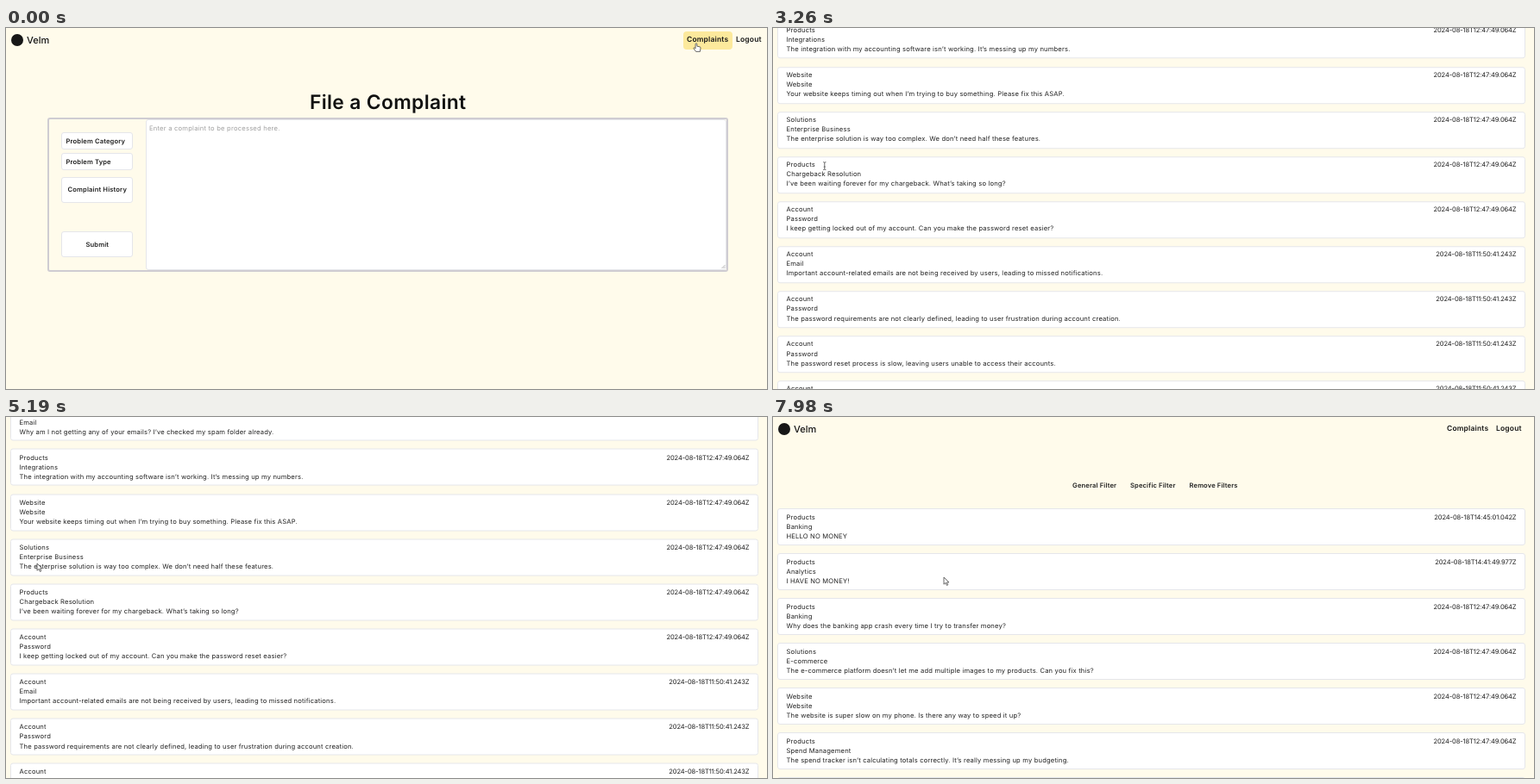
An HTML page that plays this animation: 882 px wide and 419 px high, repeating every 8000 ms.

```html
<!DOCTYPE html>
<html lang="en">
<head>
<meta charset="utf-8">
<title>Complaints</title>
<style>
  html, body { margin: 0; width: 100%; height: 100%; overflow: hidden; background: #fffbeb; }
  body { position: relative; font: 440 7.6px Inter, sans-serif; font-optical-sizing: none;
    text-rendering: geometricPrecision; letter-spacing: .17px; color: #222; }
  #stage { position: absolute; left: 0; top: 0; width: 882px; height: 419px; overflow: hidden; }
  #page, #form, #list { position: absolute; left: 0; top: 0; width: 882px; }
  .t { position: absolute; line-height: 11px; margin-top: -5.5px; white-space: pre; }
  .box { position: absolute; box-sizing: border-box; background: #fff; border: 1px solid #e5e6ea; border-radius: 3px; }
  .date { right: 20.5px; letter-spacing: -.15px; }
  .brand { font-size: 11px; font-weight: 500; letter-spacing: 0; color: #171717; }
  .nav { font-size: 8.5px; font-weight: 600; color: #171717; }
  .bold { font-weight: 600; letter-spacing: .14px; }
  .title { font-size: 22.8px; font-weight: 600; letter-spacing: .35px; color: #111; }
  .hint { color: #a0a0a0; letter-spacing: .22px; }
  .mid { transform: translateX(-50%); }
  .sel { background: #3066d0; color: #fff; padding-right: 2px; }
  .frame { background: none; border: 2px solid #cfccd2; }
  .hover { background: #fce99c; border: 0; border-radius: 4px; }
  .mark { background: #171717; border: 0; border-radius: 50%; }
  svg { position: absolute; left: 0; top: 0; overflow: visible; }
</style>
</head>
<body>
<div id="stage">
  <div id="page">
    <div id="nav"></div>
    <div id="filters"></div>
    <div id="list"></div>
    <div id="form"></div>
  </div>
  <svg id="cursor" width="12" height="14" fill="#fff" stroke="#444" stroke-width=".8" stroke-linejoin="round">
    <path id="arrow" d="M0 0V8.2L2 6.4L3.4 9.4L4.8 8.8L3.4 5.9H6Z"/>
    <path id="hand" d="M-.9 .4Q0-1 .9 .4V3.2L4 3.8Q5.2 4 5 5.4L4.4 9.4H-.4L-3 5.6Q-2.8 4.4-1.8 4.9L-.9 5.8Z"/>
    <path id="beam" fill="none" d="M-1.6-4.5Q0-4.5 0-3.5Q0-4.5 1.6-4.5M0-3.5V3.5M-1.6 4.5Q0 4.5 0 3.5Q0 4.5 1.6 4.5M-1 1H1"/>
  </svg>
</div>
<script>
const LOOP = 8000, PITCH = 52.06;
const PAGE_SWITCH = 430, LIST_LOAD = 1130;
const $ = id => document.getElementById(id);

function add(parent, cls, x, y, text) {
  const el = document.createElement("div");
  el.className = cls;
  if (x !== null) el.style.left = x + "px";
  el.style.top = y + "px";
  if (text) el.textContent = text;
  parent.append(el);
  return el;
}
const label = (parent, text, x, y, cls = "") => add(parent, "t " + cls, x, y, text);
function box(parent, x, y, w, h, cls = "") {
  const el = add(parent, "box " + cls, x, y);
  el.style.width = w + "px";
  el.style.height = h + "px";
  return el;
}

// General category | specific category | complaint
const rows = `Products|Banking|HELLO NO MONEY
Products|Analytics|I HAVE NO MONEY!
Products|Banking|Why does the banking app crash every time I try to transfer money?
Solutions|E-commerce|The e-commerce platform doesn’t let me add multiple images to my products. Can you fix this?
Website|Website|The website is super slow on my phone. Is there any way to speed it up?
Products|Spend Management|The spend tracker isn’t calculating totals correctly. It’s really messing up my budgeting.
Solutions|Small Business|The small business tool is confusing. Can you simplify the setup process?
Account|Email|Why am I not getting any of your emails? I’ve checked my spam folder already.
Products|Integrations|The integration with my accounting software isn’t working. It’s messing up my numbers.
Website|Website|Your website keeps timing out when I’m trying to buy something. Please fix this ASAP.
Solutions|Enterprise Business|The enterprise solution is way too complex. We don’t need half these features.
Products|Chargeback Resolution|I’ve been waiting forever for my chargeback. What’s taking so long?
Account|Password|I keep getting locked out of my account. Can you make the password reset easier?
Account|Email|Important account-related emails are not being received by users, leading to missed notifications.
Account|Password|The password requirements are not clearly defined, leading to user frustration during account creation.
Account|Password|The password reset process is slow, leaving users unable to access their accounts.
Account|Email|Users cannot change the email address on their account without contacting support.
Account|Email|Verification emails arrive late, which prevents users from completing registration.
Website|Website|The website experiences frequent downtimes during critical hours, which affects user access and leads to loss of business.
Website|Website|The website’s performance is sluggish, especially on mobile devices, causing a poor user experience.
Website|Website|There are multiple broken links across the website, leading to dead-end pages that confuse users.
Website|Website|The website design is not intuitive, making it difficult for users to navigate and find the information they need.
Website|Website|The website does not comply with accessibility standards, making it difficult for users with disabilities to use the site.
Products|Integrations|The integration with our third-party services frequently fails, resulting in incomplete transactions and lost data.
Products|Account Payable|The accounts payable module does not allow for bulk invoice uploads, which slows down our financial processes.
Products|Accounting|The accounting module is not balancing correctly, leading to discrepancies in our financial statements.
Products|Analytics|The analytics dashboard does not update in real time, which delays our decisions.
Products|Banking|The banking module does not support transfers between multiple accounts.
Products|Spend Management|The spend reports are missing categories, making it difficult to track expenses.
Solutions|Small Business|The small business solution lacks the features needed to manage daily operations.
Solutions|E-commerce|The e-commerce checkout fails often, leading to abandoned orders.
Solutions|Enterprise Business|The enterprise solution does not scale well with a growing number of users.`
  .split("\n").map(line => line.split("|"));

const stamp = i => "2024-08-18T" +
  (i < 1 ? "14:45:01.042" : i < 2 ? "14:41:49.977" : i < 13 ? "12:47:49.064" : "11:50:41.243") + "Z";

const cards = rows.map(([general, specific, text], i) => {
  const y = 116 + i * PITCH, list = $("list");
  box(list, 5, y - 10, 867, 43);
  const parts = [label(list, general, 15.5, y), label(list, specific, 15.5, y + 11.1)];
  label(list, text, 15.5, y + 22.2);
  parts.push(label(list, stamp(i), null, y, "date"));
  return parts;
});

box($("page"), 6, 7, 14, 14, "mark");
label($("page"), "Velm", 24, 14, "brand");
const hover = box($("nav"), 785, 3.5, 57, 21, "hover");
label($("nav"), "Complaints", 789, 14, "nav");
label($("nav"), "Logout", 846, 14, "nav");
label($("filters"), "General Filter", 372.7, 79.6, "bold mid");
label($("filters"), "Specific Filter", 440.3, 79.6, "bold mid");
label($("filters"), "Remove Filters", 510.6, 79.6, "bold mid");

function buildForm(form) {
  label(form, "File a Complaint", 442.7, 86, "title mid");
  box(form, 162, 106, 673, 175);
  box(form, 48, 104, 789, 179, "frame");
  label(form, "Enter a complaint to be processed here.", 166, 116, "hint");
  const buttons = [[121, 20], [145, 20], [173, 30], [236, 30]];
  for (const [y, h] of buttons) box(form, 64.4, y, 83, h);
  label(form, "Problem Category", 69.5, 131, "bold");
  label(form, "Problem Type", 69.5, 155, "bold");
  label(form, "Complaint History", 105.8, 187.7, "bold mid");
  label(form, "Submit", 105.8, 251, "bold mid");
  form.insertAdjacentHTML("beforeend",
    '<svg width="1" height="1" stroke="#888" stroke-width=".6"><path d="M829.5 279L833.5 275M831.5 279L833.5 277"/></svg>');
}
buildForm($("form"));

// Each key is [time, value, value...]; values ease between keys.
function tween(keys, t) {
  const n = keys.findIndex(k => k[0] > t);
  if (n === 0) return keys[0].slice(1);
  if (n < 0) return keys[keys.length - 1].slice(1);
  const a = keys[n - 1], b = keys[n];
  const p = (t - a[0]) / (b[0] - a[0]), e = p * p * (3 - 2 * p);
  return a.slice(1).map((v, i) => v + (b[i + 1] - v) * e);
}

const scrollKeys = [[2720, 0], [3790, 1042], [4300, 1300], [5190, 485.5], [6120, 279], [6780, 279], [7930, 0]];
const hoverKeys = [[1200, 1], [1590, .1], [1800, 0]];
const cursorKeys = [[0, 800, 18], [500, 806, 17], [1590, 818, 12], [1730, 816, 14], [2460, 42, 185],
  [2720, 42, 185], [3790, 77, 136], [5190, 36, 170], [6180, 62, 265], [6480, 15.5, 253],
  [6780, 15.5, 253], [7930, 198, 186]];
const kinds = [[1750, "hand"], [2400, "arrow"], [4600, "beam"], [6100, "arrow"], [6800, "beam"], [LOOP, "arrow"]];

const show = (el, on) => { el.style.display = on ? "" : "none"; };
const move = (el, x, y) => { el.style.transform = `translate(${x}px, ${y}px)`; };

function draw(t) {
  const loaded = t >= LIST_LOAD;
  show($("form"), t < PAGE_SWITCH);
  show($("filters"), t >= PAGE_SWITCH);
  show($("list"), loaded);
  move($("nav"), loaded ? -8 : 0, 0);
  move($("filters"), loaded ? 0 : 4, 0);
  move($("page"), 0, -tween(scrollKeys, t)[0]);
  hover.style.opacity = tween(hoverKeys, t)[0];

  const [general, specific, date] = cards[8];
  specific.classList.toggle("sel", t >= 6250);
  general.classList.toggle("sel", t >= 6380);
  date.classList.toggle("sel", t >= 6380);
  date.style.right = t >= 6380 ? "18.5px" : "";

  const kind = kinds.find(k => t < k[0])[1];
  for (const id of ["arrow", "hand", "beam"]) show($(id), id === kind);
  move($("cursor"), ...tween(cursorKeys, t));
}

const start = performance.now();
function tick() {
  draw((performance.now() - start) % LOOP);
  requestAnimationFrame(tick);
}
tick();
</script>
</body>
</html>
```
